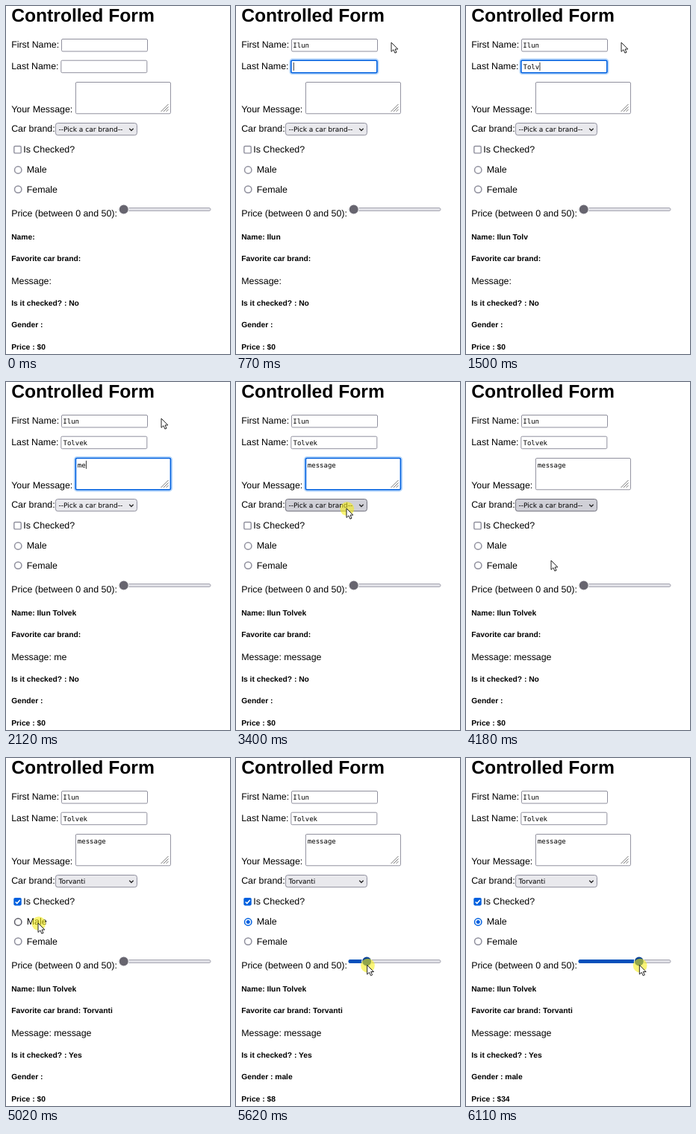
These frames come from a looping animation (300 by 468 pixels, 6330 ms). An HTML page:

```html
<!DOCTYPE html>
<html lang="en">
<head>
<meta charset="utf-8">
<title>Controlled Form</title>
<style>
  html, body { margin: 0; width: 100%; height: 100%; overflow: hidden; background: #fff; }
  svg { display: block; width: 300px; height: 468px; }
  text { font: 12.38px "Liberation Sans", Arial, sans-serif; fill: #000; white-space: pre; text-rendering: geometricPrecision; }
  .title { font-size: 24.65px; font-weight: bold; }
  .bold { font-size: 10.28px; font-weight: bold; }
  .mono { font: 9px "DejaVu Sans Mono", monospace; }
  .ui { font: 9.05px "DejaVu Sans", sans-serif; }
</style>
</head>
<body>
<svg id="stage" viewBox="0 0 300 468"></svg>
<script>
const LOOP = 6330;
const BLUE = '#0060df', GREY = '#8f8f9d', DARK = '#5b5b66';
const CHAR = 5.42; // advance of one monospace character
const LEFT = 7.2;
const brands = ['--Pick a car brand--', 'Velandor', 'KQV', 'Torvanti', 'Lumorexa', 'Yuvo'];
const stage = document.getElementById('stage');

// Each field: value, the time every key lands, focus span, box and text origin.
const fields = [
  { value: 'Ilun', keys: [200, 370, 450, 620], focus: [70, 770],
    box: [74.5, 44.5, 115, 16.5], origin: [76.3, 55.5] },
  { value: 'Tolvek', keys: [940, 1110, 1270, 1500, 1650, 1880], focus: [770, 1960],
    box: [73.8, 73.2, 115, 16.5], origin: [76.5, 84.6] },
  { value: 'message', keys: [2040, 2120, 2290, 2510, 2680, 3000, 3070], focus: [1960, 3630],
    box: [93.4, 102.5, 127, 42.3], origin: [95.8, 114.5] }
];

// time, tip x, tip y, button held
const pointer = [
  [70, 208, 49, 0], [3240, 182, 100, 0], [3320, 152, 162, 0], [3400, 148, 170, 1],
  [3630, 148, 170, 0], [3710, 142, 185, 0], [3860, 128, 212, 0], [3940, 119, 236, 0],
  [4020, 116, 243, 0], [4100, 114, 246, 1], [4180, 114, 240, 0], [4350, 113, 200, 0],
  [4520, 58, 197, 0], [4600, 22, 194, 0], [4690, 16, 193, 1], [4770, 17, 193, 0],
  [5020, 43, 222, 1], [5100, 43, 222, 0], [5310, 158, 276, 0]
];

const within = (t, a, b) => t >= a && t < b;
const text = (x, y, s, cls = '', fill = '#000') =>
  `<text x="${x}" y="${y}" class="${cls}" style="fill:${fill}">${s}</text>`;
const rect = (x, y, w, h, fill, stroke = 'none', r = 0, sw = 1) =>
  `<rect x="${x}" y="${y}" width="${w}" height="${h}" rx="${r}" fill="${fill}" stroke="${stroke}" stroke-width="${sw}"/>`;
const circle = (x, y, r, fill, stroke = 'none', sw = 1) =>
  `<circle cx="${x}" cy="${y}" r="${r}" fill="${fill}" stroke="${stroke}" stroke-width="${sw}"/>`;
const line = (d, stroke, sw = 1) =>
  `<path d="${d}" fill="none" stroke="${stroke}" stroke-width="${sw}"/>`;

const typed = (f, t) => f.value.slice(0, f.keys.filter(k => t >= k).length);

function drawField(f, t) {
  const [x, y, w, h] = f.box, [tx, ty] = f.origin;
  const value = typed(f, t), focused = within(t, ...f.focus);
  let out = focused
    ? rect(x - 1.2, y - 1.2, w + 2.4, h + 2.4, 'none', '#b5d6fb', 3, 2.8) + rect(x, y, w, h, '#fff', BLUE, 1.5, 1.6)
    : rect(x, y, w, h, '#fff', GREY, 1.5);
  out += text(tx, ty, value, 'mono');
  if (focused && t < 3240) {
    out += rect(tx + value.length * CHAR + .3, ty - 8.7, .9, 11, '#222');
  }
  return out;
}

function drawSelect(t, label) {
  const active = within(t, 3320, 4350);
  return rect(66.4, 157.5, 109, 16.2, active ? '#d0d0d7' : '#e9e9ed', active ? '#6e6e7a' : GREY, 3) +
    text(70.4, 169, label, 'ui') +
    line('M165.2 164.8l2.7 2.7 2.7-2.7', '#222', 1.3);
}

function drawPopup(t) {
  const hover = t >= 4020 ? 3 : t >= 3940 ? 2 : t >= 3860 ? 1 : 0;
  let out = rect(65.5, 174.5, 111, 122, '#2b2a33', '#45444f', 1.5);
  brands.forEach((name, i) => {
    const y = 178 + i * 19.4;
    if (i === 0) out += rect(66, y, 110, 19.4, '#e9e9ed');
    else if (i === hover) out += rect(66, y, 110, 19.4, '#52525e');
    out += text(70.4, y + 13, name, 'ui', i ? '#fbfbfe' : '#85858c');
  });
  return out;
}

function drawCheckbox(t) {
  const hover = within(t, 4520, 5020);
  if (t < 4770) return rect(10.8, 188.5, 9.4, 9.4, '#fff', hover ? DARK : GREY, 1.5, 1.4);
  return rect(10.3, 188, 10.4, 10.4, hover ? '#0250bb' : BLUE, 'none', 1.8) +
    line('M12.7 193.4l2.1 2.2 3.9-4.6', '#fff', 1.5);
}

function drawRadio(y, checked, hover) {
  const x = 16.2;
  if (checked) return circle(x, y, 4.7, '#fff', BLUE, 1.5) + circle(x, y, 2.5, BLUE);
  return circle(x, y, 4.7, '#fff', hover ? DARK : GREY, 1.5);
}

// The drag advances in 80 ms steps, speeding up slightly.
function price(t) {
  if (t >= 6110) return 34;
  const step = Math.floor((t - 5460) / 80) + 1;
  return step < 1 ? 0 : Math.min(28, Math.round(step * 2.3 + step * step * .15));
}

const thumbX = value => 157.7 + value * 2.18;

function drawSlider(t, value) {
  const x = thumbX(value), y = 273.5, held = t >= 5460;
  return rect(151, y - 2, 123, 4, '#e0e0e6', '#a0a0ac', 2, .9) +
    (value ? rect(150.5, y - 2.4, x - 150.5, 4.8, '#0250bb', 'none', 2.2) : '') +
    circle(x, y, 6.5, held ? '#054096' : '#67656f', '#f2f2f4', 1.1);
}

function drawPointer(t) {
  const now = pointer.filter(p => t >= p[0]).pop();
  if (!now) return '';
  let [, x, y, held] = now;
  if (t >= 5460) {
    x = thumbX(price(t)) + .5;
    y = 278.5;
    held = 1;
  }
  return (held ? circle(x + .8, y + .6, 9.4, 'rgba(246,238,20,.58)') : '') +
    `<path transform="translate(${x} ${y})" d="M0 0V12.4L2.9 9.8 4.9 14.2 7 13.2 5 9H8.8Z" fill="#fff" stroke="#222" stroke-width="1"/>`;
}

function render(t) {
  const [first, last, message] = fields.map(f => typed(f, t));
  const brand = t >= 4350 ? brands[3] : '';
  const male = t >= 5100, value = price(t);
  stage.innerHTML =
    text(LEFT, 21, 'Controlled Form', 'title') +
    text(LEFT, 56.3, 'First Name:') +
    text(LEFT, 85.2, 'Last Name:') +
    text(LEFT, 143, 'Your Message:') +
    text(LEFT, 169, 'Car brand:') +
    text(23.3, 197, 'Is Checked?') +
    text(27.7, 224.4, 'Male') +
    text(27.7, 250.6, 'Female') +
    text(LEFT, 282.6, 'Price (between 0 and 50):') +
    fields.map(f => drawField(f, t)).join('') +
    line('M207.5 142l10-10M211 142l6.5-6.5M214.5 142l3-3', '#777', 1) +
    drawSelect(t, brand || brands[0]) +
    drawCheckbox(t) +
    drawRadio(220.5, male, within(t, 5020, 5310)) +
    drawRadio(246.6, false, false) +
    drawSlider(t, value) +
    text(LEFT, 313.6, `Name: ${first} ${last}`, 'bold') +
    text(LEFT, 342.6, `Favorite car brand: ${brand}`, 'bold') +
    text(LEFT, 373.6, `Message: ${message}`) +
    text(LEFT, 402.8, `Is it checked? : ${t >= 4770 ? 'Yes' : 'No'}`, 'bold') +
    text(LEFT, 432.4, `Gender : ${male ? 'male' : ''}`, 'bold') +
    text(LEFT, 461.6, `Price : $${value}`, 'bold') +
    (within(t, 3630, 4180) ? drawPopup(t) : '') +
    drawPointer(t);
}

const start = performance.now();
function tick() {
  render((performance.now() - start) % LOOP);
  requestAnimationFrame(tick);
}
tick();
</script>
</body>
</html>
```
